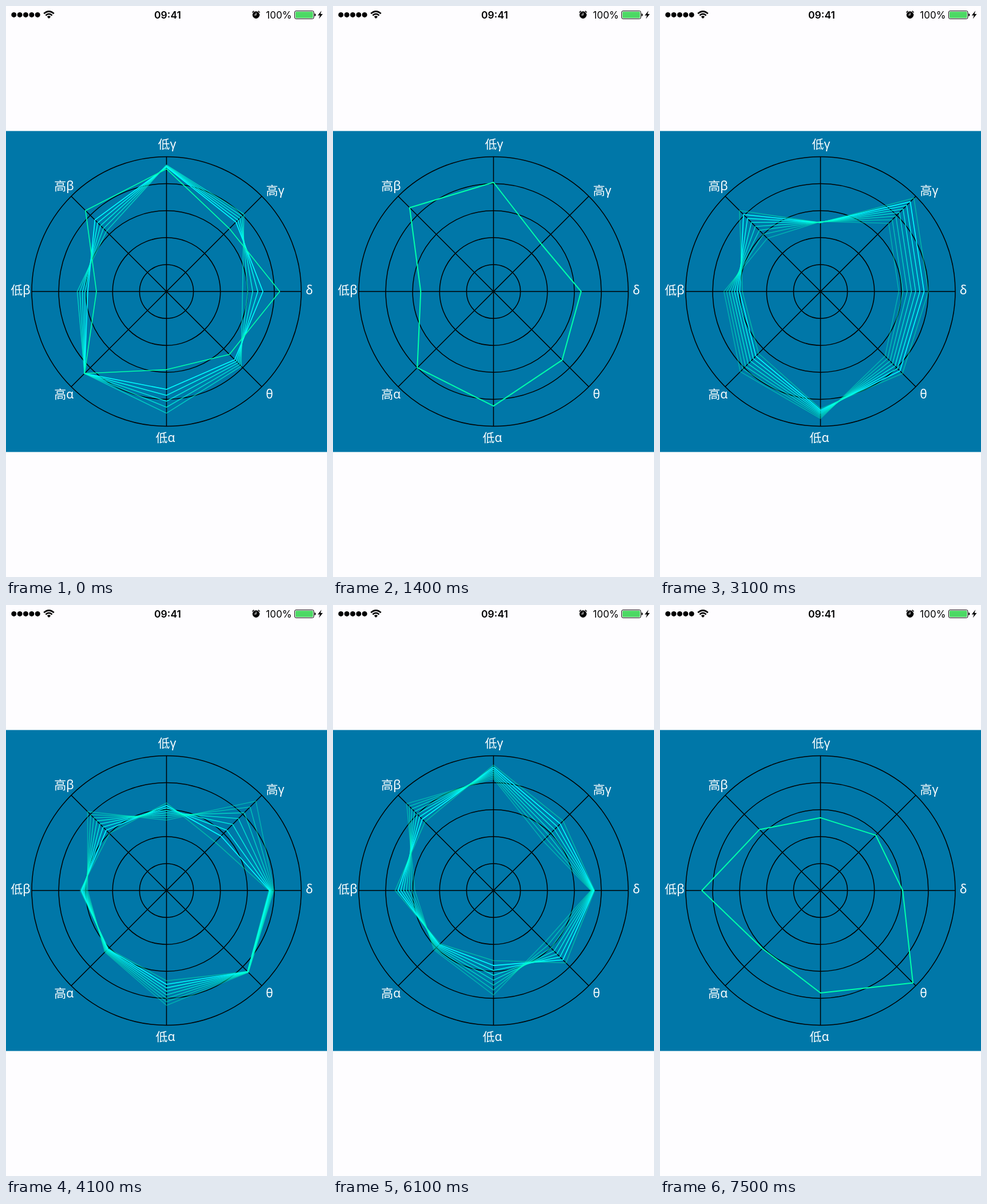
These frames come from a looping animation (561 by 998 pixels, 7900 ms). An HTML page:

```html
<!DOCTYPE html>
<html lang="zh">
<head>
<meta charset="utf-8">
<title>脑波雷达图</title>
<style>
  html, body { margin: 0; width: 100%; height: 100%; overflow: hidden; background: #fefdff; }
  svg { display: block; width: 100vw; height: 100vh; }
  .status text { font-family: Inter, "Liberation Sans", sans-serif; fill: #000; }
  .labels text { font: 21px "Noto Sans", "Noto Sans CJK SC", "Noto Sans CJK", sans-serif; fill: #fff; }
  .grid { fill: none; stroke: #000; stroke-width: 1.5; }
  .plot { fill: none; stroke-width: 1.6; stroke-linejoin: round; }
</style>
</head>
<body>
<svg viewBox="0 0 561 998" preserveAspectRatio="none">
  <rect width="561" height="998" fill="#fefdff"/>
  <g class="status">
    <g id="signal"></g>
    <g fill="none" stroke="#000" stroke-width="2.6">
      <path d="M66.2 13.2Q75 5.4 83.8 13.2"/>
      <path d="M69.4 16.5Q75 11.4 80.6 16.5"/>
    </g>
    <path d="M71.8 18.7Q75 16 78.2 18.7L75 22Z"/>
    <text x="282.5" y="21.6" font-size="17.5" font-weight="600" text-anchor="middle">09:41</text>
    <g stroke="#000" stroke-linecap="round">
      <circle cx="437" cy="15.6" r="5.8"/>
      <path d="M430.9 11L432.9 9.2M443.1 11L441.1 9.2" stroke-width="1.6"/>
      <path d="M437 12V15.8H434.2" fill="none" stroke="#fff" stroke-width="1.1"/>
    </g>
    <text x="454.3" y="21.6" font-size="17">100%</text>
    <rect x="504.5" y="8.6" width="33.5" height="13.8" rx="2.4" fill="#fff" stroke="#000"/>
    <rect x="506" y="10.1" width="30.5" height="10.8" rx="1.2" fill="#4cd964"/>
    <path d="M539.2 13Q541.4 13.4 541.4 15.5Q541.4 17.6 539.2 18Z"/>
    <path d="M551.4 8.3L544.8 16.4H548.7L546.8 22.4L553.6 13.9H549.6Z"/>
  </g>
  <rect y="218.5" width="561" height="561" fill="#0077a8"/>
  <g class="grid" id="grid"></g>
  <g class="labels">
    <text x="265.5" y="249.3">低γ</text>
    <text x="454.5" y="330.3">高γ</text>
    <text x="523.8" y="504.3">δ</text>
    <text x="454.3" y="686.3">θ</text>
    <text x="261.5" y="762.3">低α</text>
    <text x="84.2" y="686.3">高α</text>
    <text x="8.2" y="504.3">低β</text>
    <text x="84.2" y="322.3">高β</text>
  </g>
  <g class="plot" id="plot"></g>
</svg>
<script>
const LOOP = 7900, PERIOD = 1000, TICK = 100;
const CX = 280.5, CY = 499, RADIUS = 235.5, AXES = 8;
const HEAD_START = 191; // how far the first update has run when the loop begins
const TRAVEL = 335, SETTLE = 590, SPACING = 0.13, GHOSTS = 9;

// The chart's data: one reading per update, in percent, clockwise from 低γ.
const readings = [
  [94, 82, 55, 79, 92, 86, 67, 62],
  [91, 66, 84, 66, 58, 86, 52, 85],
  [81, 50, 65, 72, 85, 80, 54, 88],
  [52, 69, 56, 66, 95, 86, 73, 53],
  [51, 98, 80, 86, 87, 65, 58, 85],
  [65, 51, 76, 85, 67, 61, 64, 60],
  [82, 50, 72, 52, 80, 63, 57, 93],
  [93, 73, 75, 76, 52, 56, 73, 72],
  [54, 58, 61, 97, 76, 61, 88, 64]
];

const byId = id => document.getElementById(id);

function add(parent, tag, attrs) {
  const node = document.createElementNS(parent.namespaceURI, tag);
  return set(parent.appendChild(node), attrs);
}

function set(node, attrs) {
  for (const key in attrs) node.setAttribute(key, attrs[key]);
  return node;
}

function point(axis, percent) {
  const angle = axis * 2 * Math.PI / AXES, r = RADIUS * percent / 100;
  return [CX + r * Math.sin(angle), CY - r * Math.cos(angle)];
}

const outline = reading => reading.map((v, axis) => point(axis, v)).join(" ");
const blend = (a, b, k) => a.map((v, i) => v + (b[i] - v) * k);

for (let i = 0; i < 5; i++) {
  add(byId("signal"), "circle", { cx: 13.8 + i * 10.35, cy: 15.4, r: 4.5 });
  add(byId("grid"), "circle", { cx: CX, cy: CY, r: RADIUS * (i + 1) / 5 });
}
for (let axis = 0; axis < AXES / 2; axis++) {
  add(byId("grid"), "path", { d: `M${point(axis, 100)}L${point(axis + AXES / 2, 100)}` });
}

// Each ghost follows the moving outline, fainter and greener than the one before.
const ghosts = Array.from({ length: GHOSTS }, (_, i) => add(byId("plot"), "polygon", {
  stroke: `rgb(0,255,${255 - 11 * i})`,
  "stroke-opacity": 1 - 0.1 * i
}));
const current = add(byId("plot"), "polygon", { stroke: "#00ffaa" });

function draw(time) {
  const elapsed = Math.floor(time / TICK) * TICK + HEAD_START;
  const update = Math.min(Math.floor(elapsed / PERIOD), readings.length - 2);
  const phase = elapsed - update * PERIOD;
  const [from, to] = readings.slice(update, update + 2);
  const moving = phase < SETTLE;
  const head = phase / TRAVEL;

  ghosts.forEach((ghost, i) => {
    const progress = head - i * SPACING;
    const visible = moving && progress >= 0 && progress < 1;
    set(ghost, {
      visibility: visible ? "visible" : "hidden",
      points: outline(blend(from, to, progress))
    });
  });

  // The new outline dips as the ghosts arrive, then returns to full strength.
  const arrival = head - (1 - SPACING);
  set(current, {
    points: outline(to),
    "stroke-opacity": moving && arrival > -SPACING ? Math.min(1, 0.45 + 0.65 * Math.max(0, arrival)) : 1,
    "stroke-width": moving ? 1.6 : 2
  });
}

const start = performance.now();
function tick() {
  draw((performance.now() - start) % LOOP);
  requestAnimationFrame(tick);
}
tick();
</script>
</body>
</html>
```
